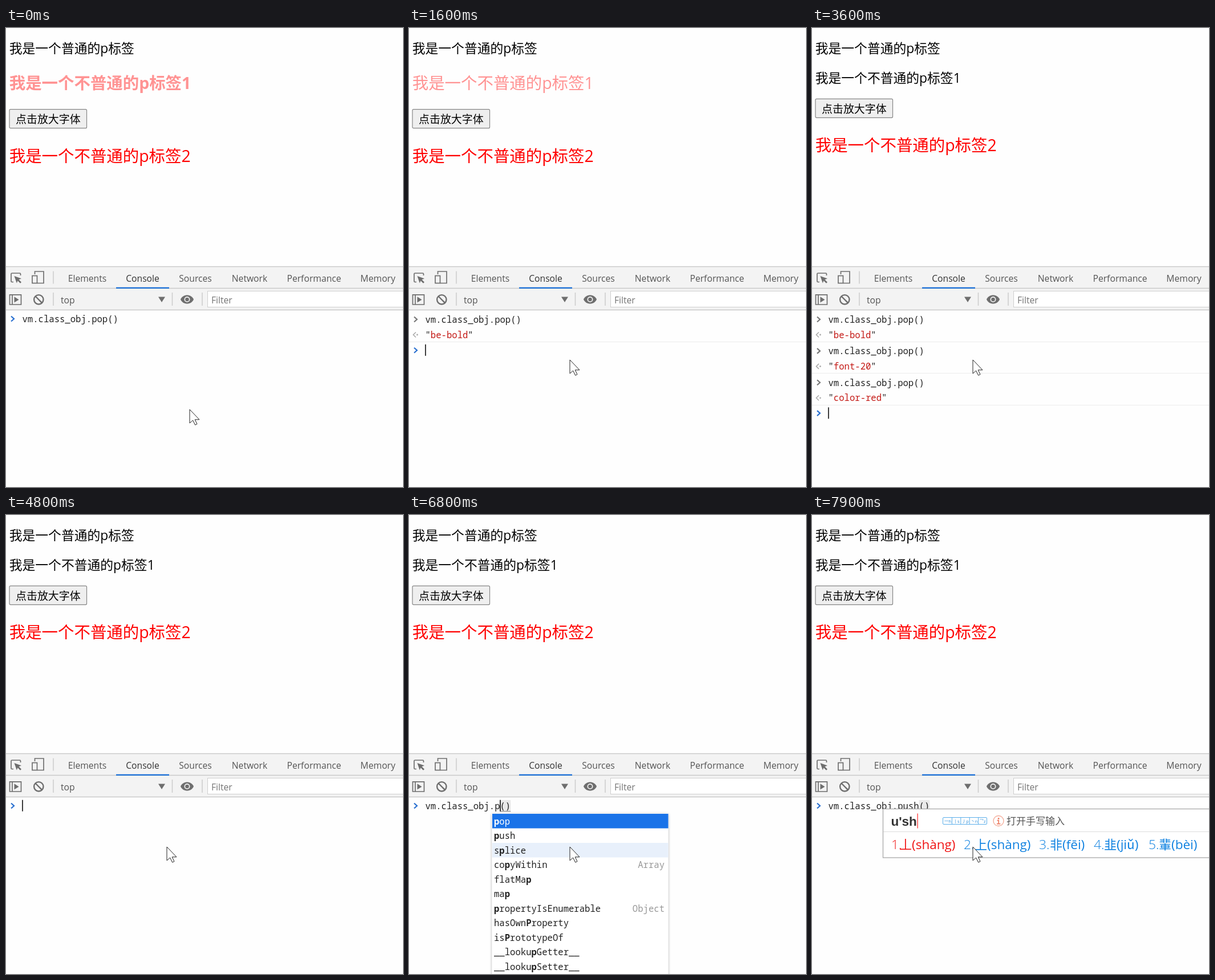
An HTML page for the animation above (8 s loop, 696x805 px).

```html
<!DOCTYPE html>
<html lang="zh-CN">
<head>
<meta charset="utf-8">
<title>Console demo</title>
<style>
html, body { margin: 0; width: 100%; height: 100%; overflow: hidden; background: #fefefe; }
svg { display: block; }
text { white-space: pre; }
.page { font-family: "Open Sans", "Noto Sans CJK SC", "Noto Sans CJK", sans-serif; font-size: 22.8px; }
.big { font-size: 28.45px; }
.ui { font-family: "Open Sans", "Noto Sans", sans-serif; font-size: 15.7px; fill: #555; }
.tab { text-anchor: middle; }
.code { font-family: "Noto Sans Mono", "DejaVu Sans Mono", monospace; font-size: 15.6px; fill: #222; }
.code .str { fill: #c41a16; }
.code .hit { font-weight: 700; }
.type { text-anchor: end; }
.icon { fill: none; stroke: #6e6e6e; stroke-width: 1.7; }
.solid { fill: #6e6e6e; stroke: none; }
.sep { stroke: #ccc; stroke-width: 1.5; }
.row { stroke: #ececec; }
.arrow { fill: none; stroke-width: 2.2; }
.light { font-weight: 300; }
</style>
</head>
<body>
<svg width="696" height="805" viewBox="0 0 696 805">
  <defs>
    <filter id="shade" x="-5%" y="-5%" width="110%" height="110%">
      <feDropShadow dx="0" dy="1" stdDeviation="2" flood-opacity=".35"/>
    </filter>
  </defs>
  <rect width="696" height="805" fill="#fefefe"/>
  <text class="page" x="5.7" y="44">我是一个普通的p标签</text>
  <g id="page"></g>

  <rect y="418" width="696" height="77" fill="#f3f3f3"/>
  <path d="M0 418.5H696M0 456.5H696M0 494.5H696" stroke="#c9c9c9" stroke-width="1.3"/>
  <rect x="193" y="454.7" width="93" height="2.3" fill="#1a6fd6"/>
  <path class="sep" d="M83 426.5V448.5M83 464V487M291.5 464V487M344 464V487"/>
  <g id="tabs"></g>
  <rect x="353.5" y="461.5" width="350" height="28" fill="#fff" stroke="#cfcfcf"/>
  <text class="ui" x="96" y="483">top</text>
  <text class="ui" x="360" y="483" style="fill:#757575">Filter</text>
  <path class="solid" d="M267 471.5H279L273 481Z"/>

  <g class="icon">
    <path d="M13 445.5H10.5Q9 445.5 9 444V431.5Q9 430 10.5 430H24Q25.5 430 25.5 431.5V434"/>
    <path class="solid" d="M14.5 435 27 439.5 22.5 441.2 27 445.7 25 447.7 20.5 443.2 18.8 447.5Z"/>
    <path d="M50.5 432V427H66V447.5H55"/>
    <rect x="46" y="434.5" width="8.5" height="13"/>
    <path d="M6.5 467.8H26.5V485H6.5ZM11 467.8V485"/>
    <path class="solid" d="M14.5 471.2 22.5 476.4 14.5 481.6Z"/>
    <circle cx="57.3" cy="476.3" r="8.2" stroke-width="2.4"/>
    <path d="M51.5 470.5 63.1 482.1" stroke-width="2.4"/>
    <path class="solid" d="M306 476C310 466 325 466 329 476C325 486 310 486 306 476Z"/>
    <circle cx="317.5" cy="476" r="4.2" stroke="#f3f3f3" fill="#6e6e6e"/>
  </g>

  <g id="console"></g>
  <g id="overlay"></g>
  <path id="mouse" d="M0 0V24L5.6 19L9.6 27.2L13 25.6L9.2 17.8H17Z" fill="#fff" stroke="#222"/>
</svg>

<script>
const LOOP = 8000, CHAR = 9.36, LEFT = 28.5;
const POP = 'vm.class_obj.pop()';
const RESULTS = ['be-bold', 'font-20', 'color-red'];
const $ = id => document.getElementById(id);
const call = name => `vm.class_obj.${name}()`;

// Each entry changes part of the state; caret is a column, -1 when hidden.
const up = { text: POP, caret: 18 };
const off = { caret: -1 };
const enter = n => ({ text: '', caret: 0, rows: n, pops: n });
const steps = [
  [0, { text: POP, caret: -1, focus: false, rows: 0, pops: 0, menu: false, hover: false, ime: '', hint: false }],
  [400, { focus: true, caret: 18 }], [900, off], [1400, { caret: 18 }],
  [1600, enter(1)], [2100, up], [2600, off],
  [2700, enter(2)], [3100, up],
  [3500, enter(3)], [4000, off], [4500, { caret: 0 }],
  [4800, { rows: 0 }], [5000, off], [5400, up],
  [5800, { caret: 17 }], [6200, { caret: 16 }],
  [6600, { text: call('po'), caret: 15 }],
  [6700, { text: call('p'), caret: 14, menu: true }],
  [6800, { hover: true }],
  [7200, { text: call('pu'), caret: 15, menu: false, hover: false, ime: "u" }],
  [7300, { text: call('pus'), caret: 16, ime: "u's" }],
  [7400, { text: call('push'), caret: 17, ime: "u'sh" }],
  [7800, { caret: -1, hint: true }]
];

const text = (cls, x, y, s, attrs = '') => `<text class="${cls}" x="${x}" y="${y}" ${attrs}>${s}</text>`;
const rect = (x, y, w, h, fill, attrs = '') =>
  `<rect x="${x}" y="${y}" width="${w}" height="${h}" fill="${fill}" ${attrs}/>`;
const chevron = (y, color) => `<path class="arrow" d="M9 ${y - 4.5}L14 ${y}L9 ${y + 4.5}" stroke="${color}"/>`;

function drawPage({ pops }) {
  const small = pops > 1;
  const color = pops > 2 ? '#000' : '#ff9393';
  return text(small ? 'page' : 'page big', 5.7, small ? 96.2 : 107.2, '我是一个不普通的p标签1',
      `fill="${color}" font-weight="${pops ? 400 : 700}"`) +
    `<g transform="translate(0 ${small ? -18.4 : 0})">` +
    rect(6, 142.7, 135.5, 33, '#efefef', 'rx="2" stroke="#858585" stroke-width="1.2"') +
    text('page', 17, 167, '点击放大字体', 'style="font-size:18.95px"') +
    text('page big', 5.7, 234.6, '我是一个不普通的p标签2', 'fill="#f00"') + '</g>';
}

function drawConsole({ text: line, caret, focus, rows }) {
  let out = '';
  for (let i = 0; i < rows; i++) {
    const y = 511 + 55.4 * i;
    out += chevron(y, '#777') + text('code', LEFT, y + 5.8, POP) +
      `<path class="arrow" d="M12 ${y + 22.5}L7.5 ${y + 27}L12 ${y + 31.5}" stroke="#aaa" style="stroke-width:1.6"/>` +
      `<circle cx="14.5" cy="${y + 27}" r="1.4" fill="#aaa"/>` +
      text('code', LEFT, y + 32.5, `"<tspan class="str">${RESULTS[i]}</tspan>"`) +
      `<path class="row" d="M0 ${Math.round(y + 39) + .5}H696"/>`;
  }
  const y = 510 + 55.2 * rows;
  if (focus && line) {
    const x = LEFT + CHAR * (line.length - 2);
    out += rect(x, y - 10, CHAR * 2, 20, '#e9e9e9') + rect(x, y + 9.3, CHAR * 2, 1, '#777');
  }
  out += chevron(y, '#2a70d0') + text('code', LEFT, y + 5.8, line);
  if (caret >= 0) out += rect(LEFT + CHAR * caret - .3, y - 10.3, 1.5, 20, '#000');
  return out;
}

// Stars mark the letter that matches; a colon starts the type label.
const menuItems = ['*pop', '*push', 's*plice', 'co*pyWithin:Array', 'flatMa*p', 'ma*p',
  '*propertyIsEnumerable:Object', 'hasOwn*Property', 'is*PrototypeOf', '__looku*pGetter__', '__looku*pSetter__'];

function drawMenu(hover) {
  let out = rect(145.5, 523.5, 309, 300, '#fff', 'filter="url(#shade)"');
  menuItems.forEach((item, i) => {
    const [name, type] = item.split(':');
    const top = 524 + 25.5 * i;
    if (!i) out += rect(146, top, 308.5, 25.5, '#1a73e8');
    if (i === 2 && hover) out += rect(146, top, 308.5, 25.5, '#e8f0fb');
    out += text('code', 149, top + 18.5, name.replace(/\*(.)/, '<tspan class="hit">$1</tspan>'),
      i ? '' : 'style="fill:#fff"');
    if (type) out += text('code type', 448, top + 18.5, type, 'style="fill:#999"');
  });
  return out;
}

const candidates = [
  [139, 153, '丄', 'shàng'], [266, 285, '上', 'shàng'], [398, 417, '非', 'fēi'],
  [494, 512, '韭', 'jiǔ'], [590, 608, '輩', 'bèi']
];

function drawIme(typed, hint) {
  const end = { 1: 153, 3: 171, 4: 185 }[typed.length];
  let out = rect(124.5, 515.5, 600, 85.5, '#fff', 'stroke="#a9a9a9" stroke-width="1.3"') +
    '<path d="M125 555.5H696" stroke="#dcdcdc"/>' +
    text('', 138.5, 545, typed, 'font-family="Liberation Sans, sans-serif" font-weight="700" font-size="22.5" fill="#333"') +
    rect(end - .5, 523.5, 1.2, 26, '#f22');
  candidates.forEach(([x, cx, char, sound], i) => {
    const fill = `fill="${i ? '#0d80e0' : '#f01414'}"`;
    out += text('page light', x, 586, `${i + 1}.`, fill) +
      text('page light', cx, 586, char, fill + ' style="font-size:22px"') +
      text('page', cx + 22, 586, `(${sound})`, fill + ' font-weight="500" style="font-size:22.5px"');
  });
  if (hint) {
    out += rect(229.5, 530.5, 77, 12, '#fff', 'rx="1.5" stroke="#5aaeea"');
    ['一h', '丨s', '丿p', '丶n', '乛z'].forEach((key, i) => {
      const x = 229.5 + 15.4 * i;
      if (i) out += rect(x, 530.5, 1, 12, '#5aaeea');
      out += text('page', x + 2.5, 540, key, 'fill="#2a8cd8" style="font-size:7.5px"');
    });
    out += '<circle cx="327" cy="536.5" r="9" fill="#fff" stroke="#f3a793" stroke-width="1.3"/>' +
      rect(325.8, 531, 2.6, 2.6, '#ee7d62') +
      '<path d="M324.5 535.6H327.2V541.5M324 541.6H330.3" fill="none" stroke="#ee7d62" stroke-width="1.7"/>' +
      text('page', 341, 543, '打开手写输入', 'fill="#555" style="font-size:17px"');
  }
  return out;
}

[['Elements', 142.5], ['Console', 239.5], ['Sources', 332], ['Network', 427], ['Performance', 540], ['Memory', 652]]
  .forEach(([name, x], i) => {
    $('tabs').innerHTML += text('ui tab', x, 444.6, name, i === 1 ? 'style="fill:#333"' : '');
  });

let shown = -1;
function frame(now) {
  const t = now % LOOP;
  const k = Math.min(4, Math.floor(t / 100)) / 4;
  $('mouse').setAttribute('transform', `translate(${322 - 40 * k} ${669 - 87 * k})`);

  const past = steps.filter(step => step[0] <= t);
  if (past.length !== shown) {
    shown = past.length;
    const state = Object.assign({}, ...past.map(step => step[1]));
    $('page').innerHTML = drawPage(state);
    $('console').innerHTML = drawConsole(state);
    $('overlay').innerHTML = state.menu ? drawMenu(state.hover) : state.ime ? drawIme(state.ime, state.hint) : '';
  }
  requestAnimationFrame(frame);
}
requestAnimationFrame(frame);
</script>
</body>
</html>
```
